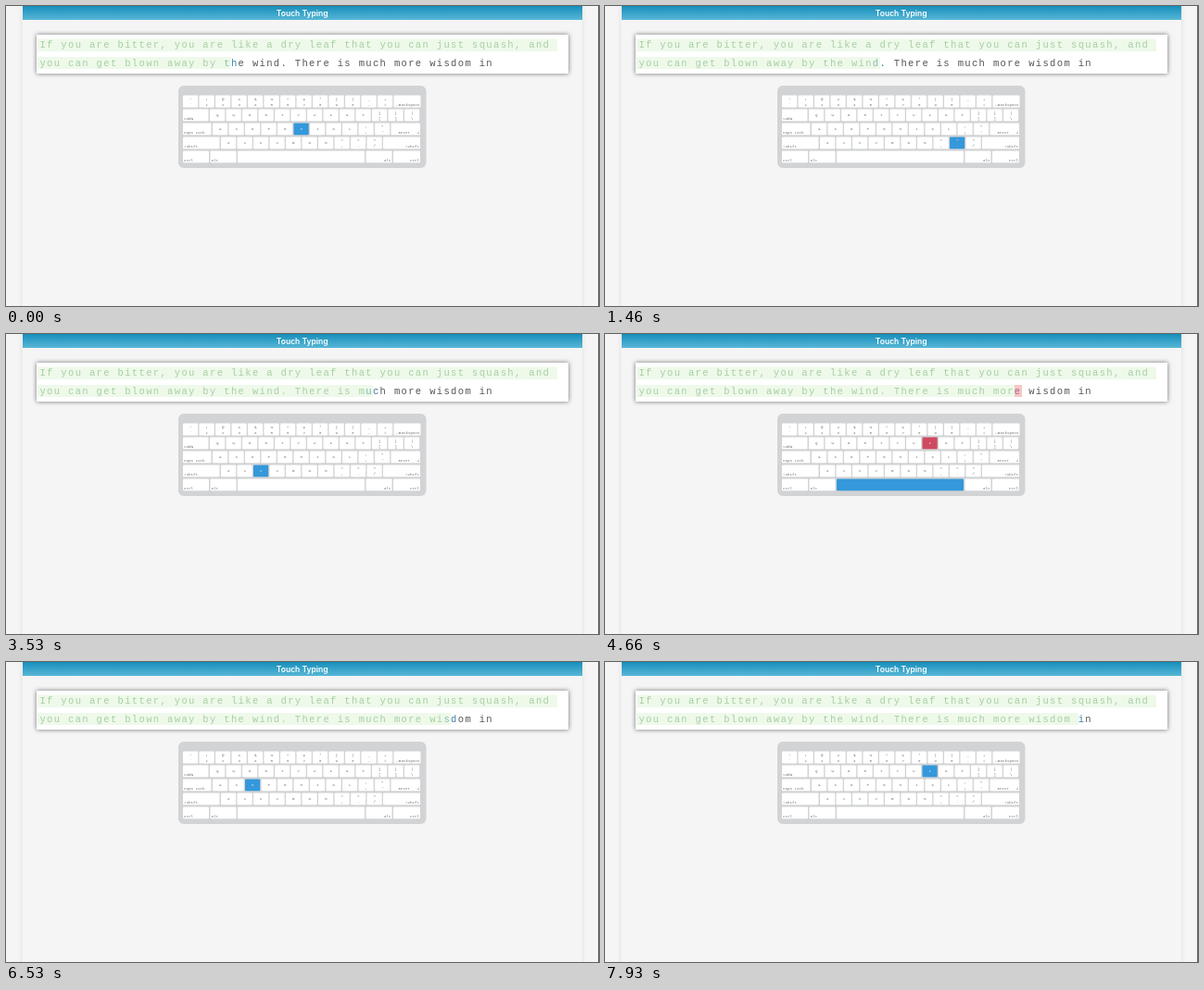
Recreate the animation shown at these times as an HTML page. Size 640x324 px, loop 8000 ms.

```html
<!DOCTYPE html>
<html lang="en">
<head>
<meta charset="utf-8">
<title>Touch Typing</title>
<style>
html, body { margin: 0; width: 100%; height: 100%; overflow: hidden; background: #f5f5f5; }
svg { display: block; width: 100vw; height: 100vh; }
.title { font: 600 8.5px Inter, sans-serif; fill: #fff; text-anchor: middle; }
.line { font: 10.5px "Liberation Mono", monospace; }
.label { font: 4.2px "Liberation Mono", "DejaVu Sans Mono", monospace; fill: #747474; white-space: pre; }
.mid { text-anchor: middle; }
.end { text-anchor: end; }
.panel { filter: drop-shadow(0 0 2.5px rgba(0, 0, 0, .55)); }
.page { filter: drop-shadow(0 0 2.5px rgba(0, 0, 0, .1)); }
</style>
</head>
<body>
<svg id="stage" viewBox="0 0 640 324" preserveAspectRatio="none">
  <defs>
    <linearGradient id="bar" x2="0" y2="1">
      <stop stop-color="#168ebb"/><stop offset="1" stop-color="#58b7d6"/>
    </linearGradient>
  </defs>
  <rect width="640" height="324" fill="#f5f5f5"/>
  <rect class="page" x="17.5" y="-10" width="604.5" height="350" fill="#f5f5f5"/>
  <rect x="639" width="1" height="324" fill="#666"/>
  <rect x="18" width="604" height="15" fill="url(#bar)"/>
  <text class="title" x="319.7" y="10.9">Touch Typing</text>
  <rect class="panel" x="33" y="31" width="574" height="42" fill="#fff"/>
  <rect x="186" y="86" width="267.5" height="89" rx="6" fill="#d2d3d5"/>
</svg>
<script>
const stage = document.getElementById('stage');
const LOOP = 8000, FADE = 200, LEFT = 36.4, PITCH = 7.65;
const LINE1 = 'If you are bitter, you are like a dry leaf that you can just squash, and ';
const LINE2 = 'you can get blown away by the wind. There is much more wisdom in';

function el(name, attrs, text) {
  const node = document.createElementNS('http://www.w3.org/2000/svg', name);
  for (const key in attrs) node.setAttribute(key, attrs[key]);
  if (text) node.textContent = text;
  return stage.appendChild(node);
}

// Keyboard
const keys = {};

function addKey(id, x, y, width) {
  const cap = el('rect', { x, y, width, height: 12.8, rx: 1, fill: '#fff' });
  return keys[id] = { cap, labels: [] };
}

function addLabel(key, text, x, y, align) {
  key.labels.push(el('text', { x, y, class: 'label ' + align }, text));
}

function addRun(chars, shifted, x, y) {
  [...chars].forEach((char, i) => {
    const left = x + i * 17.5, center = left + 8.2;
    const key = addKey(char.toLowerCase(), left, y, 16.2);
    const upper = shifted[i];
    if (upper && upper !== ' ') {
      addLabel(key, upper, center, y + 5, 'mid');
      addLabel(key, char, center, y + 11, 'mid');
    } else {
      addLabel(key, char, center, y + 7.6, 'mid');
    }
  });
}

function addWide(id, text, x, y, right, align) {
  const key = addKey(id, x, y, right - x);
  if (text) addLabel(key, text, align ? right - 1 : x + 1, y + 11.5, align || '');
}

const rows = [96.6, 111.5, 126.5, 141.4, 156.4];
addRun('`1234567890-=', '~!@#$%^&*()_+', 191, rows[0]);
addWide('back', '←Backspace', 418.5, rows[0], 447.5, 'end');
addWide('tab', 'tab↹', 191, rows[1], 218.5);
addRun('QWERTYUIOP[]\\', '          {}|', 220, rows[1]);
addWide('caps', 'Caps Lock', 191, rows[2], 221.5);
addRun("ASDFGHJKL;'", '         :"', 223, rows[2]);
addWide('enter', 'Enter   ↲', 415.5, rows[2], 447, 'end');
addWide('shiftL', '⇧Shift', 191, rows[3], 230.5);
addRun('ZXCVBNM,./', '       <>?', 232, rows[3]);
addWide('shiftR', '⇧Shift', 407, rows[3], 447, 'end');
addWide('ctrlL', 'ctrl', 191, rows[4], 219);
addWide('altL', 'alt', 220.5, rows[4], 248.5);
addWide(' ', '', 250, rows[4], 387);
addWide('altR', 'alt', 388.5, rows[4], 416.5, 'end');
addWide('ctrlR', 'ctrl', 418, rows[4], 447, 'end');

// Text
el('rect', { x: 34, y: 35.5, width: 561, height: 13.5, fill: '#eef9ea' });
[...LINE1].forEach((char, i) =>
  el('text', { x: LEFT + i * PITCH, y: 45, class: 'line', fill: '#a7cfa2' }, char));

const cells = [...LINE2].map((char, i) => ({
  back: el('rect', {
    x: i ? LEFT + i * PITCH : 34, y: 54.5, height: 13,
    width: i ? PITCH : LEFT + PITCH - 34, 'shape-rendering': 'crispEdges'
  })
}));
cells.forEach((cell, i) => {
  cell.glyph = el('text', { x: LEFT + i * PITCH, y: 64.5, class: 'line' }, LINE2[i]);
});

// Caret moves: time, position, mistaken key
const moves = [
  [-150, 27], [200, 28], [390, 29], [600, 30], [800, 31], [980, 32], [1150, 33],
  [1320, 34], [1690, 35], [1840, 36], [1960, 37], [2060, 38], [2160, 39],
  [2400, 40], [2560, 41], [2720, 42], [2880, 43], [3030, 44], [3160, 45],
  [3290, 46], [3420, 47], [3670, 48], [3820, 49], [3970, 50], [4110, 51],
  [4250, 52], [4390, 53], [4540, 54, 'i'], [5000, 53], [5280, 54], [5480, 55],
  [5750, 56], [6050, 57], [6390, 58], [6750, 59], [7050, 60], [7350, 61], [7800, 62]
];

// Glyph colour, then background
const looks = {
  todo: [[84, 84, 84], [255, 255, 255]],
  now: [[52, 145, 205], [255, 255, 255]],
  done: [[167, 207, 162], [238, 249, 234]],
  bad: [[218, 88, 92], [250, 198, 198]]
};

function stateOf(i, step) {
  const [, caret, slip] = moves[step];
  if (i < caret) return slip && i === caret - 1 ? 'bad' : 'done';
  return i === caret ? 'now' : 'todo';
}

function mix(from, to, p) {
  return `rgb(${from.map((v, i) => Math.round(v + (to[i] - v) * p))})`;
}

function paintKey(id, color) {
  keys[id].cap.setAttribute('fill', color);
  keys[id].labels.forEach(label => {
    label.style.fill = color === '#fff' ? '' : '#d5e6f2';
  });
}

function draw(time) {
  let now = 0;
  while (now + 1 < moves.length && moves[now + 1][0] <= time) now++;

  cells.forEach((cell, i) => {
    const state = stateOf(i, now);
    let since = now;
    while (since > 0 && stateOf(i, since - 1) === state) since--;
    const before = since ? stateOf(i, since - 1)
      : i === moves[0][1] ? 'todo' : i === moves[0][1] - 1 ? 'now' : state;
    const p = Math.min(1, (time - moves[since][0]) / FADE);
    const [ink, paper] = looks[state], [oldInk, oldPaper] = looks[before];
    cell.glyph.setAttribute('fill', mix(oldInk, ink, p));
    cell.back.setAttribute('fill', mix(oldPaper, paper, Math.min(1, p * 2)));
  });

  const [, caret, slip] = moves[now];
  const wanted = LINE2[caret].toLowerCase();
  for (const id in keys) {
    paintKey(id, id === slip ? '#cf4a60' : id === wanted ? '#3498db' : '#fff');
  }
}

const start = performance.now();
function tick() {
  draw((performance.now() - start) % LOOP);
  requestAnimationFrame(tick);
}
tick();
</script>
</body>
</html>
```
